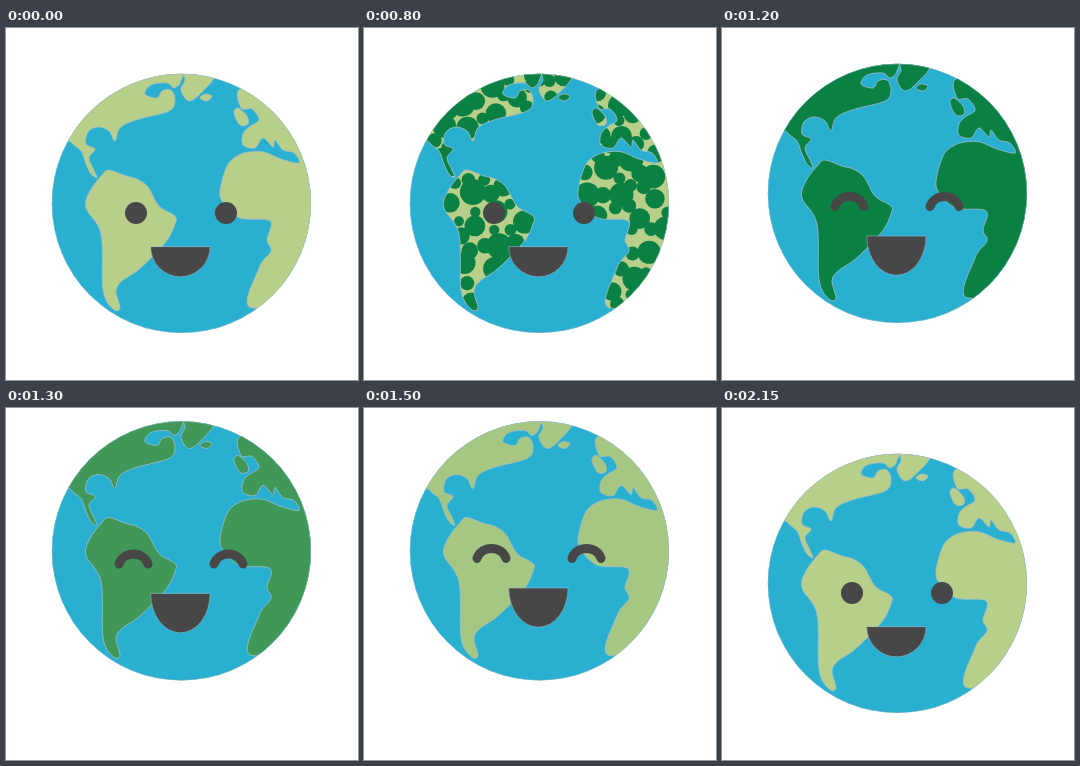
Recreate the animation shown at these times as an HTML page with a canvas. Size 352 by 352 pixels, loop 3150 ms.

```html
<!DOCTYPE html>
<html lang="en">
<head>
<meta charset="utf-8">
<title>Happy Earth</title>
<style>
  html, body { margin: 0; width: 100%; height: 100%; overflow: hidden; background: #fff; }
  canvas { display: block; width: 352px; height: 352px; }
</style>
</head>
<body>
<canvas></canvas>
<script>
const SIZE = 352, LOOP = 3150, CENTER = 175.4, RADIUS = 129.6;
const SEA = '#29b0d0', FACE = '#474747', COAST = '#a3bbcc';
const FOREST = [11, 128, 67], MEADOW = [183, 207, 136];

const canvas = document.querySelector('canvas');
const ctx = canvas.getContext('2d');
const ratio = window.devicePixelRatio || 1;
canvas.width = canvas.height = SIZE * ratio;

const mix = (a, b, t) => a + (b - a) * t;
const clamp = t => Math.min(1, Math.max(0, t));

// Adds a closed Catmull-Rom curve through the listed points.
function addCoast(path, text) {
  const points = text.trim().split(/\s+/).map(pair => pair.split(',').map(Number));
  const at = i => points[(i + points.length) % points.length];
  path.moveTo(...at(0));
  points.forEach(([x, y], i) => {
    const before = at(i - 1), next = at(i + 1), after = at(i + 2);
    path.bezierCurveTo(
      x + (next[0] - before[0]) / 6, y + (next[1] - before[1]) / 6,
      next[0] - (after[0] - x) / 6, next[1] - (after[1] - y) / 6,
      ...next);
  });
}

const northAmerica = `60,100 66,115 75,123 80,136 85,146 91,150 88,142 83,130 89,121 80,116
  82,104 92,99 103,103 109,113 114,100 130,92 163,83 169,72 165,62 156,63 151,70 139,66
  145,57 161,55 168,60 175,53 172,38 110,30`;
const southAmerica = `103,142 120,148 131,151 142,159 153,178 169,188 169,196 162,211 146,229
  131,243 116,253 110,263 114,280 107,281 97,262 95,206 80,180 84,163 96,147`;
const greenland = '178,40 179,52 175,62 183,73 196,64 208,46';
const iceland = '194,70 199,66 206,68 201,73';
const britain = '232,80 241,88 242,96 234,97 228,85';
const oldWorld = `237,60 235,80 246,81 253,92 243,99 237,106 237,117 249,120 257,110 267,119
  269,112 277,122 288,125 293,135 275,131 258,124 243,124 231,128 221,138 214,163 218,176
  234,190 264,193 261,212 265,223 253,240 246,280 330,250 300,70`;

const land = new Path2D();
[northAmerica, southAmerica, greenland, iceland, britain, oldWorld]
  .forEach(coast => addCoast(land, coast));

const globe = new Path2D();
globe.arc(CENTER, CENTER, RADIUS, 0, 7);

function disc(x, y, radius) {
  ctx.beginPath();
  ctx.arc(x, y, radius, 0, 7);
  ctx.fill();
}

// Scatters large trees with wide spacing, then smaller, later ones between them.
function plantTrees() {
  let seed = 7;
  const random = () => (seed = seed * 16807 % 2147483647) / 2147483647;
  const trees = [];
  for (let attempt = 0; attempt < 3000; attempt++) {
    const late = attempt > 1000;
    const x = CENTER + mix(-RADIUS, RADIUS, random());
    const y = CENTER + mix(-RADIUS, RADIUS, random());
    const radius = late ? mix(5, 9, random()) : mix(9, 13, random());
    const free = trees.every(tree => Math.hypot(tree.x - x, tree.y - y) > (late ? 13 : 22));
    if (free && ctx.isPointInPath(globe, x, y) && ctx.isPointInPath(land, x, y))
      trees.push({ x, y, radius, start: late ? 600 : 500 });
  }
  return trees;
}
const trees = plantTrees();

// Motion advances in 100 ms steps, shifted by half a step after the landing.
function stepTime(time) {
  const shift = time < 1650 ? 0 : 50;
  return Math.floor((time - shift) / 100) * 100 + shift;
}

const hop = time => -40 * Math.max(0, 1 - .75 * ((time - 1400) / 200) ** 2);
const globeY = time => time < 1200 ? 0 : hop(time);
// On the way down the face trails the globe.
const faceY = time => time < 1200 ? 0 : hop(time > 1400 ? time - 50 : time);
const smileAt = time => time < 1200 ? 0 : clamp((2150 - time) / 400);
const meadowAt = time => time < 1000 ? 1 : clamp((time - 1200) * .003);

function drawTrees(time) {
  ctx.save();
  ctx.clip(land);
  ctx.fillStyle = `rgb(${FOREST})`;
  for (const { x, y, radius, start } of trees)
    if (time >= start) disc(x, y, mix(1, radius, (time - start) / (800 - start)));
  ctx.restore();
}

function drawGlobe(time) {
  const meadow = meadowAt(time);
  ctx.save();
  ctx.translate(0, globeY(time));
  ctx.fillStyle = SEA;
  ctx.fill(globe);
  ctx.clip(globe);
  ctx.fillStyle = `rgb(${FOREST.map((c, i) => Math.round(mix(c, MEADOW[i], meadow)))})`;
  ctx.fill(land);
  if (time < 1000) drawTrees(time);
  ctx.strokeStyle = COAST;
  ctx.lineWidth = .8;
  ctx.stroke(land);
  ctx.stroke(globe);
  ctx.restore();
}

// The arched eye shrinks to a point while its round stroke thickens into a dot.
function drawEye(side, smile) {
  const x = 175 + side * mix(45, 47.5, smile), y = mix(185, 188.5, smile);
  if (!smile) return disc(x, y, 11);
  const curve = 10 * smile, rise = 13.3 * smile, half = 14.5 * smile;
  ctx.beginPath();
  ctx.moveTo(x - half, y);
  ctx.bezierCurveTo(x - curve, y - rise, x + curve, y - rise, x + half, y);
  ctx.lineWidth = mix(22, 9, smile);
  ctx.stroke();
}

function drawFace(time) {
  const smile = smileAt(time);
  ctx.save();
  ctx.translate(0, faceY(time));
  ctx.fillStyle = ctx.strokeStyle = FACE;
  ctx.lineCap = 'round';
  drawEye(-1, smile);
  drawEye(1, smile);
  ctx.beginPath();
  ctx.ellipse(174.4, mix(219, 218.3, smile), 29.7, mix(29.8, 39, smile), 0, 0, Math.PI);
  ctx.closePath();
  ctx.fill();
  ctx.strokeStyle = COAST;
  ctx.lineWidth = .5;
  ctx.stroke();
  ctx.restore();
}

function draw(now) {
  const time = stepTime(now % LOOP);
  ctx.setTransform(ratio, 0, 0, ratio, 0, 0);
  ctx.fillStyle = '#fff';
  ctx.fillRect(0, 0, SIZE, SIZE);
  drawGlobe(time);
  drawFace(time);
  requestAnimationFrame(draw);
}

requestAnimationFrame(draw);
</script>
</body>
</html>
```
